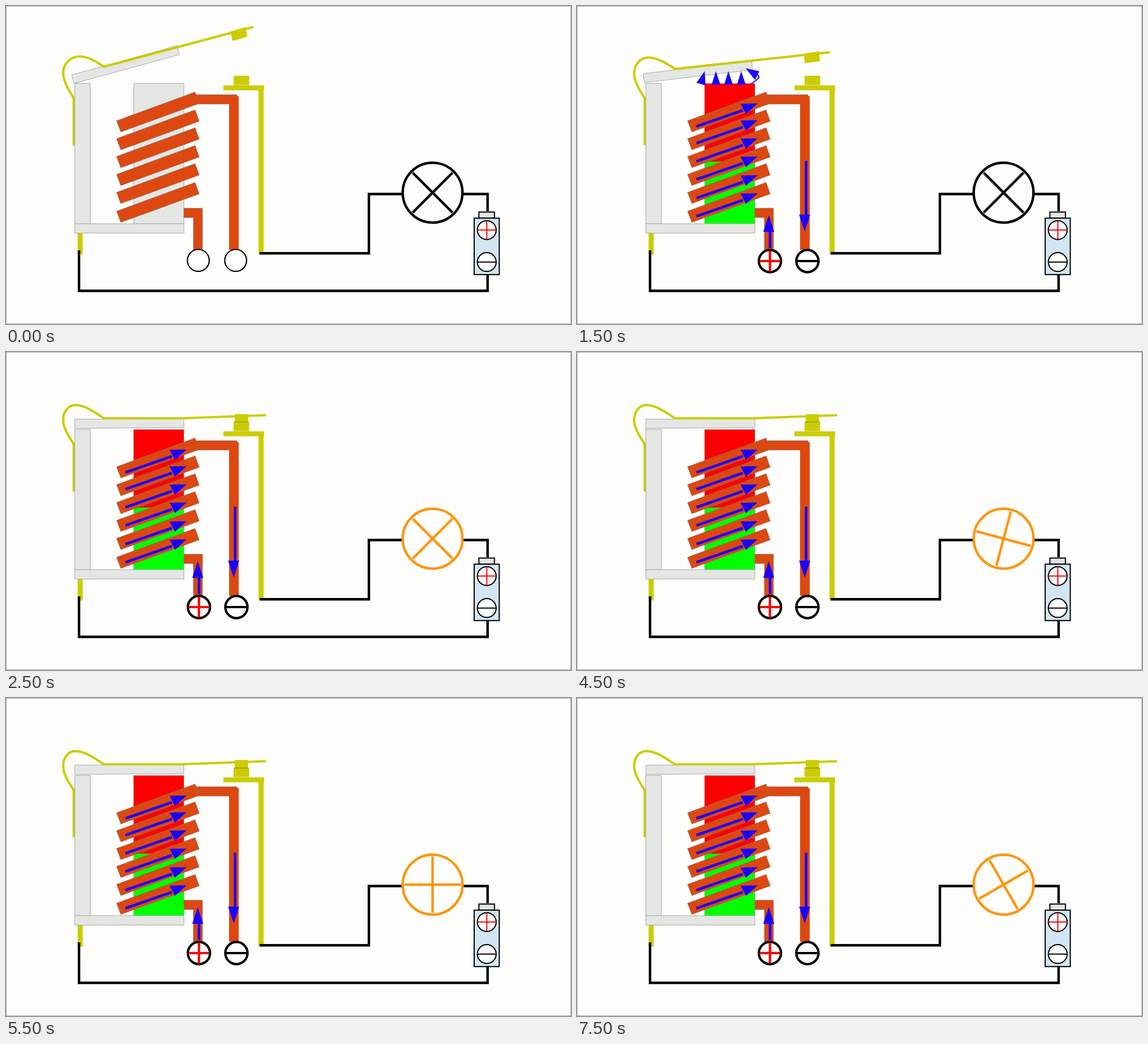
Recreate the animation shown at these times as an HTML page. Size 998x561 px, loop 8 s.

```html
<!DOCTYPE html>
<html lang="en">
<head>
<meta charset="utf-8">
<title>Relay</title>
<style>
  html, body { margin: 0; width: 100%; height: 100%; overflow: hidden; background: #fdfefc; }
  svg { display: block; width: 998px; height: 561px; }
  .iron { fill: #e4e6e3; stroke: #999; stroke-width: .8; }
  .coil { fill: #dd4810; stroke: #777; stroke-width: .7; }
  .brass { fill: #cbcc00; }
  .spring { fill: none; stroke: #cbcc00; stroke-width: 4.2; }
  .wire { fill: none; stroke: #000; stroke-width: 4.4; }
  .flow { fill: none; stroke: #1b00ff; stroke-width: 4.6; }
  .head { fill: #1b00ff; }
  .ring { fill: #fff; stroke: #000; }
  .plus { stroke: #f00; fill: none; }

  .open, .off, .on, .pull, .half, .shut, .lamp, .spokes { animation: 8s step-end infinite; }
  .open, .off, .on, .pull, .half, .shut { visibility: hidden; }
  .open { animation-name: open; }
  .off { animation-name: off; }
  .on { animation-name: on; }
  .pull { animation-name: pull; }
  .half { animation-name: half; }
  .shut { animation-name: shut; }
  .lamp { fill: none; stroke-width: 4.4; animation-name: glow; }
  .spokes { transform-origin: 753.5px 329.3px; animation-name: turn; }

  @keyframes open { 0% { visibility: visible } 18.75%, to { visibility: hidden } }
  @keyframes off { 0% { visibility: visible } 6.25%, to { visibility: hidden } }
  @keyframes on { 0% { visibility: hidden } 6.25%, to { visibility: visible } }
  @keyframes pull { 0% { visibility: hidden } 6.25% { visibility: visible } 18.75%, to { visibility: hidden } }
  @keyframes half { 0% { visibility: hidden } 18.75% { visibility: visible } 31.25%, to { visibility: hidden } }
  @keyframes shut { 0% { visibility: hidden } 31.25%, to { visibility: visible } }
  @keyframes glow { 0% { stroke: #000 } 31.25%, to { stroke: #ff930a } }
  @keyframes turn {
    0%, 31.25% { transform: rotate(45deg) }
    43.75% { transform: rotate(30deg) }
    56.25% { transform: rotate(15deg) }
    68.75% { transform: rotate(0deg) }
    81.25% { transform: rotate(-15deg) }
    93.75%, to { transform: rotate(-30deg) }
  }
</style>
</head>
<body>
<svg viewBox="0 0 998 561">
  <defs>
    <path id="bar" class="coil" d="M195.3 202.5 334 151.7 341.3 171.9 202.8 222.3Z"/>
    <g id="arrow">
      <path class="flow" d="M211 212.5 293 184"/>
      <path class="head" d="M319 172 289 172.5 298.500 190.500Z"/>
    </g>
    <path id="tip" class="head" d="M0 0 8 24H-7.5Z"/>
  </defs>

  <rect x=".5" y=".5" width="997" height="560" fill="#fdfefc" stroke="#aaa"/>

  <!-- core and yoke -->
  <rect class="iron" x="225.700" y="136.700" width="88.500" height="247.500"/>
  <g class="on">
    <path fill="#f00" d="M225.500 137H314V275H225.500Z"/>
    <path fill="#0f0" d="M225.500 274.500H314V384H225.500Z"/>
  </g>
  <rect class="brass" x="126.500" y="401" width="9" height="37.500"/>
  <path class="spring" d="M119.700 246V162"/>
  <rect class="iron" x="121.500" y="136.700" width="27.500" height="247.500"/>
  <rect class="iron" x="121.500" y="384" width="192.700" height="16.700"/>

  <!-- winding -->
  <path class="coil" d="M335 156.500H408V173H335Z"/>
  <path fill="#dd4810" d="M394 159H411V430H394Z"/>
  <path class="coil" d="M314.200 356.700H347V430H331V373.200H314.200Z"/>
  <use href="#bar"/>
  <use href="#bar" y="31.500"/>
  <use href="#bar" y="63"/>
  <use href="#bar" y="94.500"/>
  <use href="#bar" y="126.300"/>
  <use href="#bar" y="159.500"/>

  <!-- fixed contact -->
  <path class="brass" d="M402 123H429.500V139.500H402ZM384 140H456V148.700H455V438H446V148.700H384Z"/>

  <!-- armature -->
  <g class="open">
    <path class="iron" d="M116 121.500 302 70 306 86 120.500 136.500Z"/>
    <path class="spring" d="M120 163C106 142 101 129 101 118 101 102 114 89 130 89 145 89 159 98 173 107L437 37"/>
    <path class="brass" d="M396 45 422.500 37.500 426.500 54 400.500 61.800Z"/>
  </g>
  <g class="half">
    <path class="iron" d="M116.800 119.300 308.500 97 310.200 112.500 119 135Z"/>
    <path class="spring" d="M120 163C106 142 101 130 101 119 101 103 112 91 126 91 142 91 158 101 173 111L447 81.500"/>
    <path class="brass" d="M400.500 84 427.500 80 429.500 97.300 402.300 101Z"/>
  </g>
  <g class="shut">
    <path class="iron" d="M121.500 118.300H314.200V133.300L121.500 134.800Z"/>
    <path class="spring" d="M120 163C106 142 101 131 101 120 101 105 110 94 122 93.700 139 93.500 157 106 173 117H308L459.500 111.500"/>
    <path class="brass" d="M404 109.500H427.500V123.500H404Z"/>
    <path stroke="#777500" stroke-width=".8" d="M402 123.500H429"/>
  </g>

  <!-- magnetic pull -->
  <g class="pull">
    <path class="flow" stroke-width="3" d="M226 137V126M245.500 137V122M267.500 137V118M290 137V114"/>
    <use href="#tip" x="226" y="106"/>
    <use href="#tip" x="245.500" y="101"/>
    <use href="#tip" x="267.500" y="97"/>
    <use href="#tip" x="290" y="92"/>
  </g>
  <g class="half">
    <path class="head" d="M225.500 115 211 135.500 227 140Z"/>
    <use href="#tip" x="245.300" y="115"/>
    <use href="#tip" x="267.300" y="115"/>
    <use href="#tip" x="290" y="115"/>
    <path class="head" d="M298 110 322 115 314.500 130.500Z"/>
    <path class="flow" style="stroke-width:2" d="M316 121C323 122 322 127 319 129L308 137"/>
  </g>

  <!-- coil current -->
  <g class="on">
    <use href="#arrow"/>
    <use href="#arrow" y="29.500"/>
    <use href="#arrow" y="61.500"/>
    <use href="#arrow" y="93.500"/>
    <use href="#arrow" y="126.500"/>
    <use href="#arrow" y="158.500"/>
    <path class="flow" d="M404.700 273V370M341 427V397"/>
    <path class="head" d="M392.300 368H412L402.300 398ZM329 398.500H348.500L338.700 369Z"/>
  </g>

  <!-- coil terminals -->
  <g class="off" stroke-width="2.200">
    <circle class="ring" cx="339.700" cy="448.800" r="19.300"/>
    <circle class="ring" cx="405.700" cy="448.800" r="19.300"/>
  </g>
  <g class="on" stroke-width="4.200">
    <circle class="ring" cx="340.800" cy="450" r="19.600"/>
    <path class="plus" d="M322.500 450H359M340.800 431.500V468.500"/>
    <circle class="ring" cx="407" cy="450" r="19.600"/>
    <path stroke="#000" d="M388 450H426"/>
  </g>

  <!-- load circuit -->
  <path class="wire" d="M129 431V502.500H850.700V472M448 436.300H641V331.700H701M806 331.700H850.700V362"/>
  <g class="lamp">
    <circle cx="753.500" cy="329.300" r="52.800" fill="#fdfefc"/>
    <path class="spokes" d="M703.800 329.300H803.200M753.500 279.600V379"/>
  </g>

  <!-- battery -->
  <g stroke="#000" stroke-width="2">
    <rect x="835.300" y="363.500" width="27.500" height="11" fill="#e4e4e4"/>
    <rect x="827" y="374.300" width="44.300" height="99.500" fill="#d2e5f3"/>
    <circle class="ring" cx="849.200" cy="395.300" r="16.600"/>
    <path class="plus" d="M833 395.300H865.500M849.300 379V411.500"/>
    <circle class="ring" cx="849.200" cy="451.700" r="16.600"/>
    <path d="M833 451.700H865.500"/>
  </g>
</svg>
</body>
</html>
```
